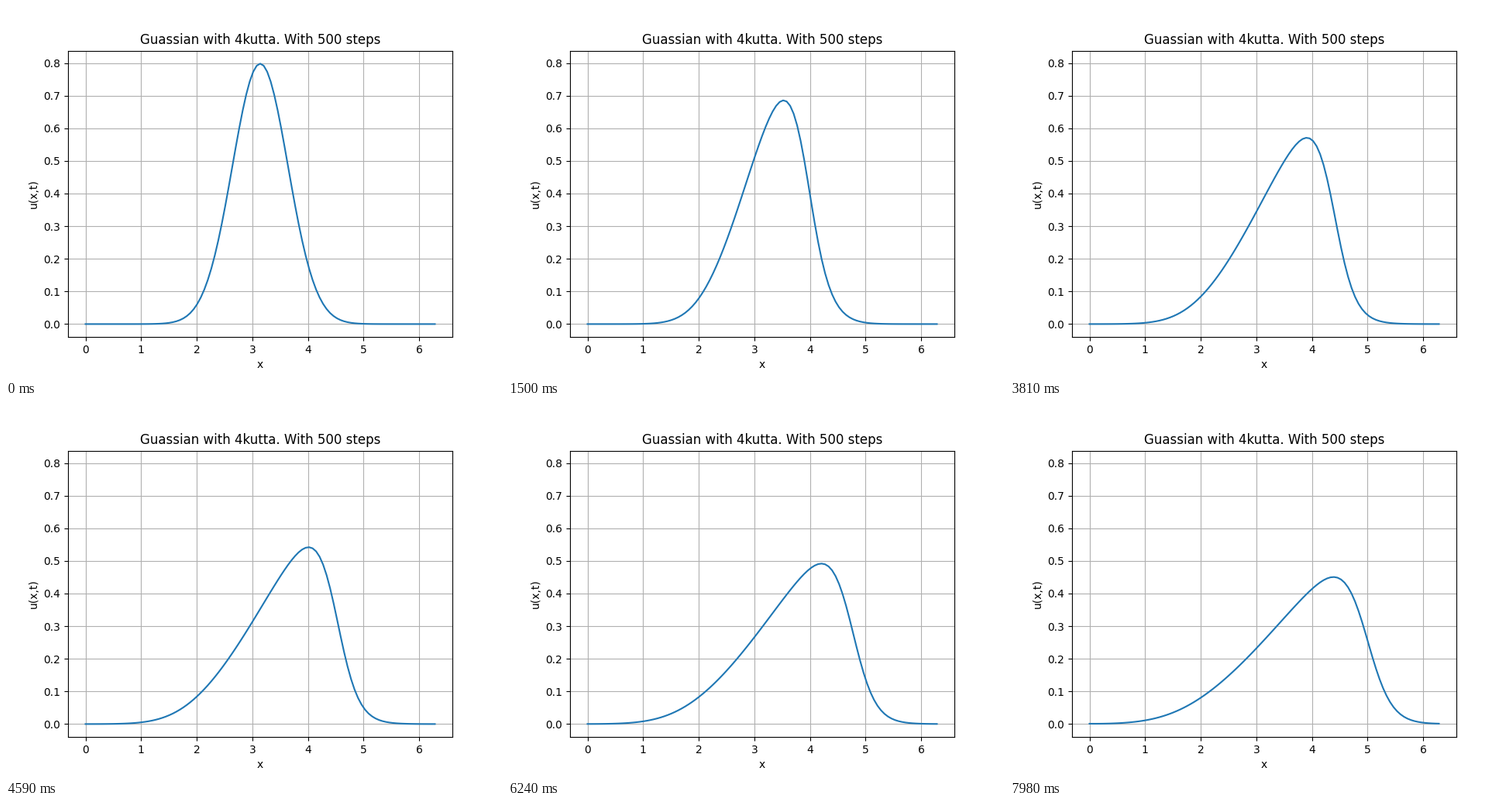
Animation of 640 by 480 pixels, one loop 8000 ms. Source, as a matplotlib script:

```python
import numpy as np
import matplotlib.pyplot as plt
from matplotlib.animation import FuncAnimation

# Viscous Burgers equation u_t + u u_x = nu u_xx on a periodic domain
NU = 0.07
LENGTH = 2 * np.pi
STEPS = 500
DT = LENGTH / STEPS
POINTS = 101
FRAMES = 267
SIGMA = 0.5

x = np.linspace(0, LENGTH, POINTS)
dx = x[1] - x[0]


def gaussian(x):
    scale = SIGMA * np.sqrt(2 * np.pi)
    return np.exp(-((x - np.pi) / SIGMA) ** 2 / 2) / scale


def rate(u):
    left, right = np.roll(u, 1), np.roll(u, -1)
    slope = (right - left) / (2 * dx)
    curvature = (right - 2 * u + left) / dx ** 2
    return -u * slope + NU * curvature


def rk4(u):
    k1 = rate(u)
    k2 = rate(u + DT / 2 * k1)
    k3 = rate(u + DT / 2 * k2)
    k4 = rate(u + DT * k3)
    return u + DT / 6 * (k1 + 2 * k2 + 2 * k3 + k4)


def solve(count):
    u = gaussian(x)
    states = [u]
    for _ in range(count - 1):
        u = rk4(u)
        states.append(u)
    return states


states = solve(FRAMES)

fig, ax = plt.subplots(figsize=(6.4, 4.8), dpi=100)
line, = ax.plot(x, states[0], color="tab:blue", lw=1.5)
ax.set_title("Guassian with 4kutta. With 500 steps")
ax.set_xlabel("x")
ax.set_ylabel("u(x,t)")
ax.grid(True)
ax.set_xlim(ax.get_xlim())
ax.set_ylim(ax.get_ylim())


def draw(i):
    line.set_ydata(states[i])
    return line,


anim = FuncAnimation(fig, draw, frames=FRAMES, interval=30,
                     repeat=True, repeat_delay=0)
plt.show()
```
